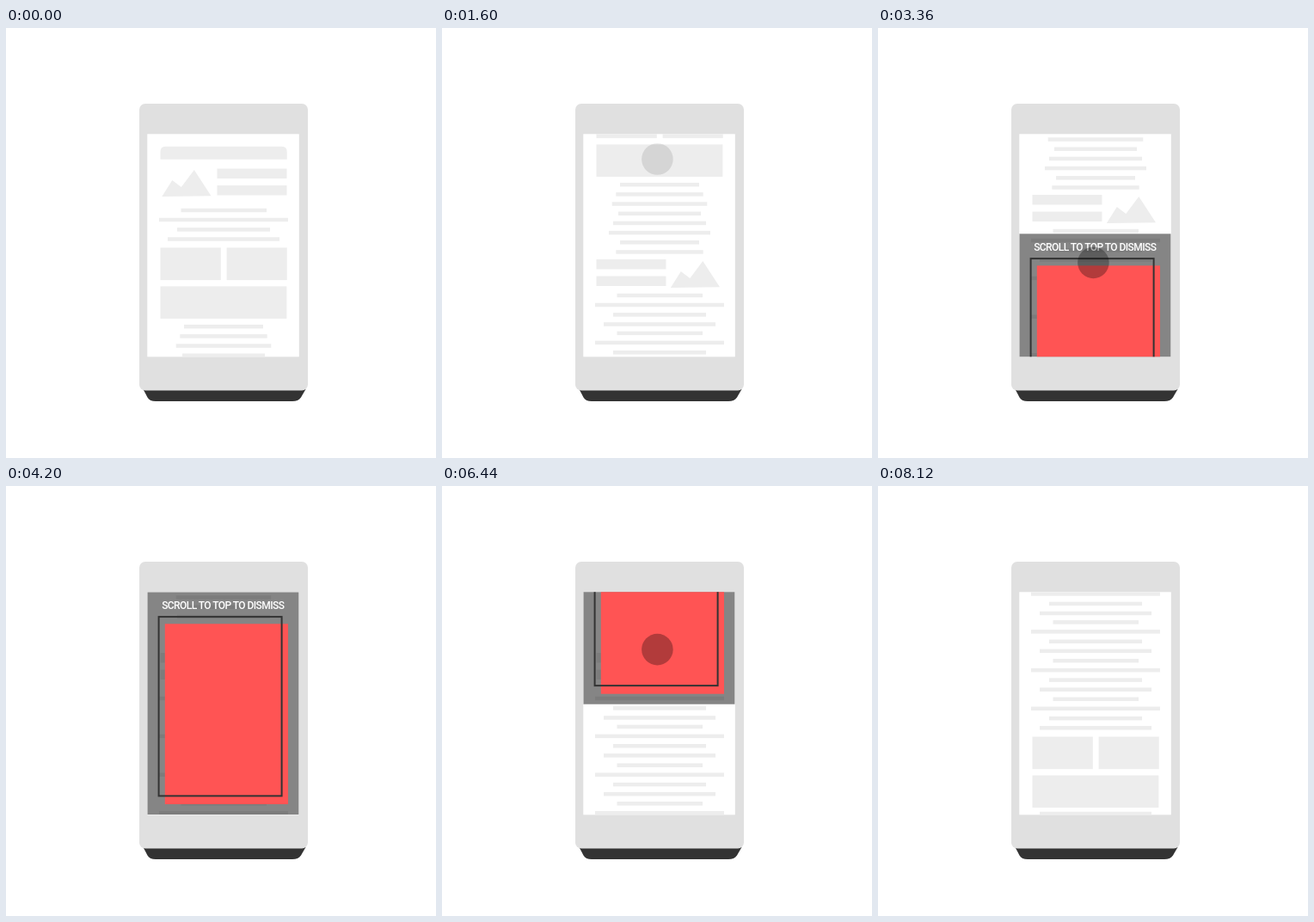
Recreate the animation shown at these times as an HTML page. Size 500 px wide and 500 px high, loop 8.68 s.

```html
<!DOCTYPE html>
<html lang="en">
<head>
<meta charset="utf-8">
<title>Scrolling page with a full-screen ad</title>
<style>
  html, body { margin: 0; width: 100%; height: 100%; overflow: hidden; background: #fff; }
  svg { display: block; width: 100%; height: 100%; }
  text { font: 500 12px Roboto, sans-serif; letter-spacing: -0.55px; fill: #fff; text-anchor: middle; }
</style>
</head>
<body>
<svg viewBox="0 0 500 500">
  <defs>
    <clipPath id="screen"><rect x="164.3" y="123.3" width="176.5" height="259"/></clipPath>
  </defs>
  <path d="M159.5 420 L164.5 429.5 Q167 434 174 434 H333 Q340 434 343 429.5 L348.5 420 Z" fill="#333"/>
  <rect x="155" y="88" width="196" height="333.5" rx="7" fill="#e0e0e0"/>
  <rect x="164.3" y="123.3" width="176.5" height="259" fill="#fff"/>
  <g clip-path="url(#screen)">
    <g id="page" fill="#ededed"></g>
    <g id="ad">
      <rect x="164.3" y="123.3" width="176.2" height="258.7" fill="#000" fill-opacity=".48"/>
      <rect x="184.8" y="160.3" width="143.2" height="209.7" fill="#ff5454"/>
      <rect x="177.6" y="152.1" width="143" height="208.3" fill="none" stroke="#333" stroke-width="2"/>
      <text x="252.3" y="142.6">SCROLL TO TOP TO DISMISS</text>
    </g>
  </g>
  <circle id="finger" cx="250.4" r="18.3"/>
</svg>
<script>
const LOOP = 8680, STEP = 40;
const SWIPES = [440, 1720, 3000, 5640, 6920];
const SCROLL = [[560, 0], [1440, 165], [1840, 165], [2240, 240], [7280, 240], [7920, 361.5]];
const AD = [[2200, 259], [2720, 159.5], [3120, 159.5], [4000, 0], [5760, 0],
            [6640, -166], [7040, -166], [7320, -260]];

const $ = id => document.getElementById(id);
const clamp = v => Math.max(0, Math.min(1, v));
const page = $("page"), ad = $("ad"), finger = $("finger");

function add(tag, attrs) {
  const el = document.createElementNS("http://www.w3.org/2000/svg", tag);
  for (const k in attrs) el.setAttribute(k, attrs[k]);
  page.appendChild(el);
}
const box = (x1, x2, y, height) => add("rect", { x: x1, y, width: x2 - x1, height });
const line = (x1, x2, y) => box(x1, x2, y - 2.25, 4.5);

function paragraph(y) {
  line(203.5, 303, y);
  line(178, 328, y + 11);
  line(199, 307, y + 22.4);
  line(188, 318, y + 33.5);
}
function article(barX, barY, hillX, hillY) {
  box(barX, barX + 81, barY, 11.5);
  box(barX, barX + 81, barY + 19.5, 11.5);
  add("path", { d: `M${hillX} ${hillY} l12 -19 l10.5 8 l15 -20 l19.7 30.3 Z` });
}
function tiles(y) {
  box(179.5, 249.8, y, 37.7);
  box(256.6, 326.7, y, 37.7);
  box(179.5, 326.4, y + 45, 37.5);
}

function buildPage() {
  add("path", { d: "M179.5 152.7 V144 Q179.5 137.8 185.5 137.8 H320.7 Q326.7 137.8 326.7 144 V152.7 Z" });
  article(245.5, 163.5, 181.3, 196);
  paragraph(212);
  tiles(255.4);
  [46, 50.7, 55.3, 48, 54, 59, 46, 50.7].forEach((half, i) =>
    line(253 - half, 253 + half, 347.2 + i * 11.18));
  article(179.5, 434, 265.8, 467);
  [476, 519.9, 564.7, 609.3].forEach(paragraph);
  tiles(653);
  line(188, 318, 742.5);
}

// Linear interpolation through [time, value] pairs
function at(keys, t) {
  let value = keys[0][1];
  for (let i = 1; i < keys.length; i++) {
    const [t0, a] = keys[i - 1], [t1, b] = keys[i];
    if (t >= t0) value = a + (b - a) * clamp((t - t0) / (t1 - t0));
  }
  return value;
}

function draw(time) {
  const t = Math.floor((time % LOOP) / STEP) * STEP;
  page.setAttribute("transform", `translate(0 ${-at(SCROLL, t)})`);

  const shift = at(AD, t);
  ad.setAttribute("transform", `translate(0 ${shift})`);
  ad.setAttribute("visibility", Math.abs(shift) < 259 ? "visible" : "hidden");

  const start = SWIPES.filter(s => s <= t).pop();
  const u = start === undefined ? LOOP : t - start;
  const alpha = Math.min(clamp((u + 40) / 80), clamp((1200 - u) / 120));
  finger.setAttribute("cy", 318 - 165.5 * clamp((u - 120) / 880));
  finger.setAttribute("fill-opacity", 0.3 * alpha);
}

buildPage();
let origin;
function tick(now) {
  origin ??= now;
  draw(now - origin);
  requestAnimationFrame(tick);
}
draw(0);
requestAnimationFrame(tick);
</script>
</body>
</html>
```
